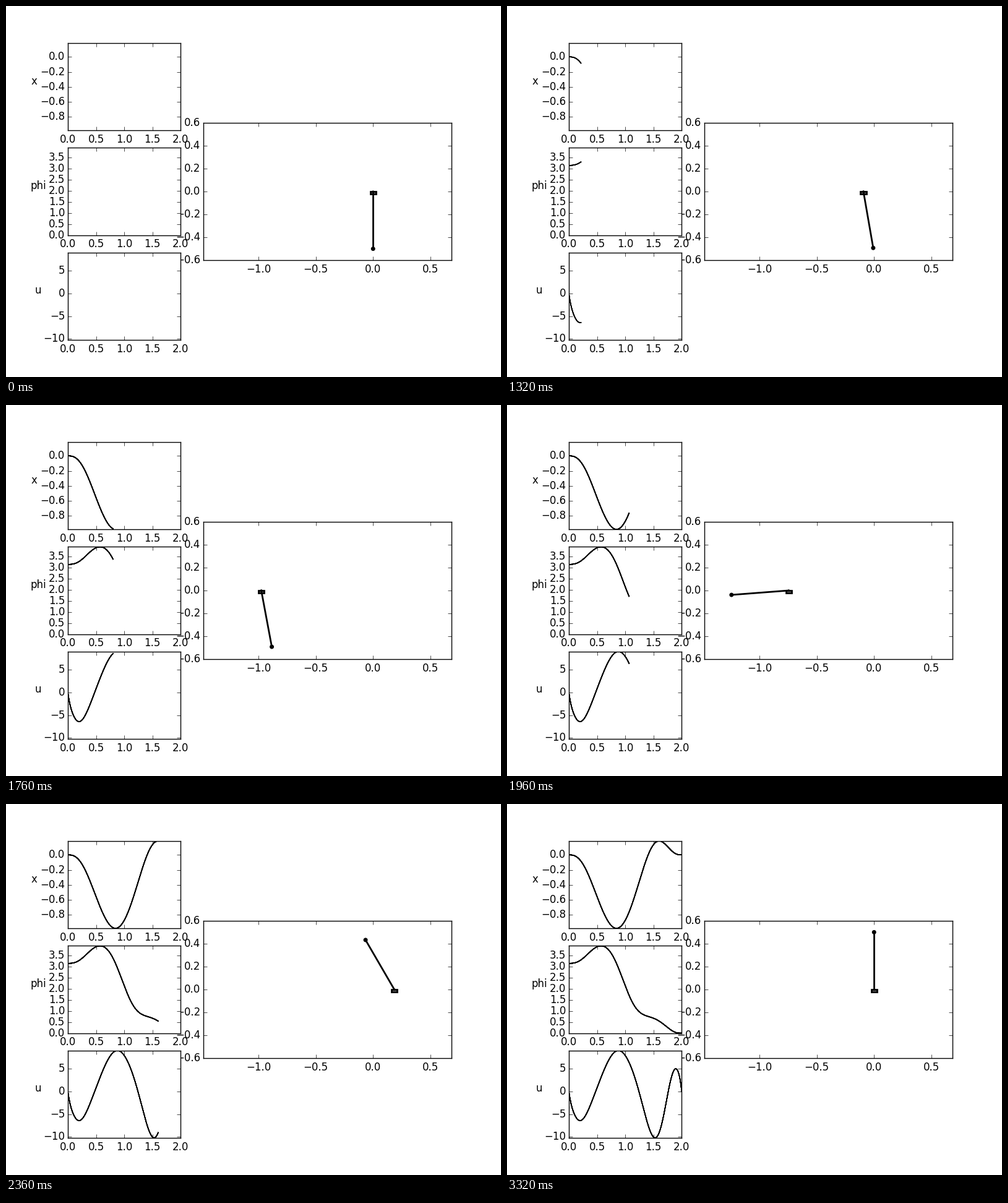
Recreate the animation shown at these times as a matplotlib script. Size 800 by 600 pixels, loop 3.84 s.

```python
import numpy as np
import matplotlib.pyplot as plt
from matplotlib.animation import FuncAnimation
from matplotlib.patches import Circle, Rectangle
from numpy.polynomial import Chebyshev

plt.style.use("classic")
plt.rcParams.update({"figure.facecolor": "white", "font.family": "DejaVu Sans",
                     "ytick.major.pad": 3.3})

FRAMES, INTERVAL = 96, 40
START = 29            # frame at which the swing-up begins
STEP = 8 / 150        # simulated seconds per frame
LAG = 0.01            # the curves trail the pendulum by one sample
T_END = 2
ROD, GRAVITY = 0.5, 9.81
COPIES = 10           # the curves are overdrawn, which hardens their edges

X_MIN, X_MAX = -0.981, 0.184
U_MIN, U_MAX = -10.25, 9.05
PHI_MAX = 3.93

# ---- trajectory ----
# Smooth modes that start and end at rest, with no acceleration.
SPAN = (0, T_END)
s = Chebyshev.identity(SPAN) - 1
modes = [(1 - s**2)**3 * Chebyshev.basis(n, SPAN) for n in range(10)]
WEIGHTS = (185, 10, 7.3, 0.4)     # by order of derivative


def rows(t, order=0):
    return np.array([m.deriv(order)(t) for m in modes]).T


def turn(order, t, value):
    """A turning point: the value there, and zero slope."""
    return [(order, t, value), (order + 1, t, 0)]


def equations(keys, base):
    a = [WEIGHTS[n] * rows(t, n) for n, t, _ in keys]
    b = [WEIGHTS[n] * (v - base.deriv(n)(t)) for n, t, v in keys]
    return np.array(a), np.array(b)


def solve(a, b):
    return np.linalg.lstsq(a, b, rcond=None)[0]


def curve(base, coef):
    return base + sum(c * m for c, m in zip(coef, modes))


# The cart moves by its turning points and those of its acceleration u.
x_keys = [(0, 0.437, -0.434), (0, 1.29, -0.25),
          *turn(0, 0.845, X_MIN), *turn(0, 1.6, X_MAX),
          *turn(2, 0.198, -6.42), *turn(2, 0.88, U_MAX),
          *turn(2, 1.53, U_MIN), *turn(2, 1.895, 5.05)]
rest = 0 * s
x_at = curve(rest, solve(*equations(x_keys, rest)))
u_at = x_at.deriv(2)

# The angle obeys the pendulum equation, solved by Gauss-Newton steps
# that start from a smooth step from pi to 0.
swing = np.pi * (0.5 - (15 * s - 10 * s**3 + 3 * s**5) / 16)
phi_keys = [(0, 0.437, 3.79), *turn(0, 0.565, PHI_MAX), (0, 0.81, 3.327),
            (0, 1.29, 0.877), (0, 1.61, 0.528)]
a_key, b_key = equations(phi_keys, swing)
coef = solve(a_key, b_key)
grid = np.linspace(0, T_END, 61)
for _ in range(12):
    phi_at = curve(swing, coef)
    phi, u = phi_at(grid), u_at(grid)
    force = (GRAVITY * np.sin(phi) + u * np.cos(phi)) / ROD
    slope = (GRAVITY * np.cos(phi) - u * np.sin(phi)) / ROD
    a_ode = 0.3 * (rows(grid, 2) - slope[:, None] * rows(grid))
    b_ode = 0.3 * (force - phi_at.deriv(2)(grid)) + a_ode @ coef
    coef = solve(np.vstack([a_key, a_ode]), np.concatenate([b_key, b_ode]))
phi_at = curve(swing, coef)


# ---- stage ----
fig = plt.figure(figsize=(8, 6), dpi=100)
cells = fig.add_gridspec(3, 3, left=0.125, right=0.9, bottom=0.1, top=0.9,
                         wspace=0.2, hspace=0.2)


def ticks(first, last, step):
    return np.arange(round((last - first) / step) + 1) * step + first


def labels(values, digits):
    return [f"{round(v, 6) + 0.0:.{digits}f}".replace("-", "\u2212") for v in values]


def set_axes(ax, x_lim, y_lim, xs, ys, y_digits=1):
    ax.set_xticks(xs, labels(xs, 1))
    ax.set_yticks(ys, labels(ys, y_digits))
    ax.set_xlim(*x_lim)
    ax.set_ylim(*y_lim)


stage = fig.add_subplot(cells[:, 1:])
stage.set_aspect("equal")
set_axes(stage, (X_MIN - ROD, X_MAX + ROD), (-0.6, 0.6),
         ticks(-1, 0.5, 0.5), ticks(-0.6, 0.6, 0.2))

CAR_W, CAR_H = 0.05, 0.02
bob = stage.add_patch(Circle((0, -ROD), 0.015, color="black"))
car = stage.add_patch(Rectangle((-CAR_W / 2, -CAR_H), CAR_W, CAR_H,
                                facecolor="grey", edgecolor="black", linewidth=2))
joint = stage.add_patch(Circle((0, 0), 0.005, color="black"))
rod, = stage.plot([], [], color="black", linewidth=2, zorder=1,
                  scalex=False, scaley=False)


def panel(row, name, name_x, y_lim, ys, digits=1):
    ax = fig.add_subplot(cells[row, 0])
    set_axes(ax, SPAN, y_lim, ticks(0, T_END, 0.5), ys, digits)
    box = ax.get_position()
    fig.text(name_x / 800, (box.y0 + box.y1) / 2, name, fontsize=12,
             ha="center", va="bottom")
    return [ax.plot([], [], color="black", linewidth=1)[0] for _ in range(COPIES)]


plots = [
    (panel(0, "x", 45.5, (X_MIN, X_MAX), ticks(-0.8, 0, 0.2)), x_at),
    (panel(1, "phi", 52, (0, PHI_MAX), ticks(0, 3.5, 0.5)), phi_at),
    (panel(2, "u", 52, (U_MIN, U_MAX), ticks(-10, 5, 5), 0), u_at),
]


def place_pendulum(x, phi):
    tip = (x - ROD * np.sin(phi), ROD * np.cos(phi))
    bob.center = tip
    car.set_x(x - CAR_W / 2)
    joint.center = (x, 0)
    rod.set_data([x, tip[0]], [0, tip[1]])


def update(frame):
    k = frame - START
    if k < 0:
        times = np.array([])
        place_pendulum(0, np.pi)
    else:
        end = min(max(k * STEP, LAG), T_END)
        times = np.linspace(0, end, 2 + int(end / LAG))
        now = min(end + LAG, T_END)
        place_pendulum(x_at(now), phi_at(now))
    for lines, func in plots:
        for j, line in enumerate(lines):
            line.set_data(times, func(times))
            line.set_visible(j <= k + 1)
    return []


anim = FuncAnimation(fig, update, frames=FRAMES, init_func=lambda: update(0),
                     interval=INTERVAL, repeat=True, repeat_delay=0, blit=False)
plt.show()
```
